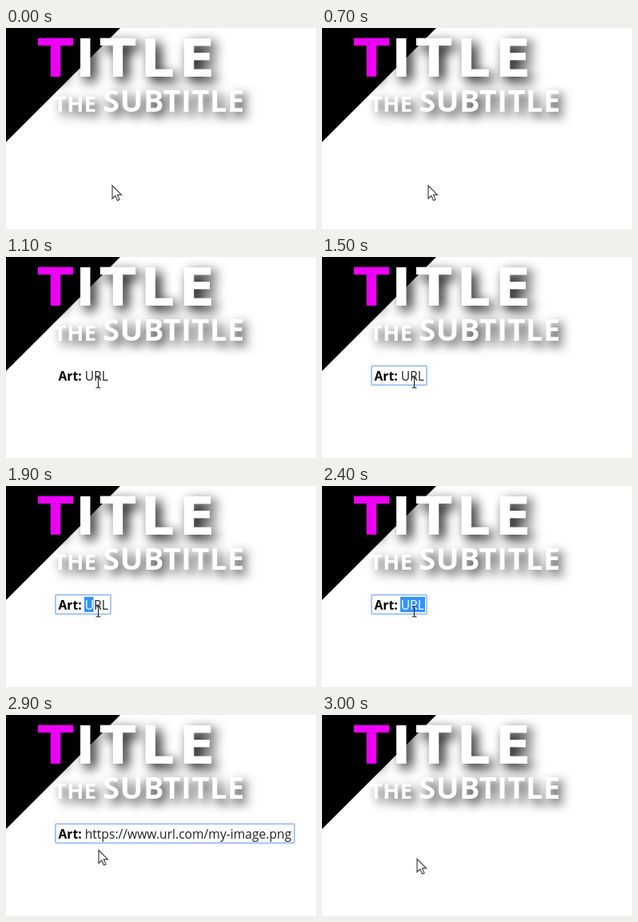
An HTML page for the animation above (3.9 s loop, 388 px wide and 252 px high).

```html
<!DOCTYPE html>
<html lang="en">
<head>
<meta charset="utf-8">
<title>Editable slide</title>
<style>
  html, body { margin: 0; width: 100%; height: 100%; overflow: hidden; background: #fff; }
  svg { display: block; width: 100vw; height: 100vh; }
  text { font-family: "Open Sans", "Noto Sans", sans-serif; white-space: pre; }
  .title { font: 700 66px "DejaVu Sans", sans-serif; letter-spacing: 6px; fill: #fff; text-shadow: 6px 6px 15px #000; }
  .title .first { fill: #ec00f6; }
  .sub { font-weight: 700; letter-spacing: .5px; fill: #fff; text-shadow: 6px 6px 13px rgba(0,0,0,.85); }
  .field text { font-size: 15.65px; fill: #222; }
  .field .label { font-weight: 700; fill: #000; }
  .field .picked { fill: #fff; }
</style>
</head>
<body>
<svg viewBox="0 0 388 252">
  <defs>
    <clipPath id="range"><rect id="rangeBox" x="98" y="139" width="0" height="19"/></clipPath>
  </defs>
  <path d="M0 0H143L0 143Z"/>
  <text class="title" y="60.7"><tspan class="first" x="39.5">T</tspan><tspan x="87">ITLE</tspan></text>
  <text class="sub" y="105"><tspan x="59.8" font-size="27.5">THE</tspan><tspan x="121.3" font-size="38">SUBTITLE</tspan></text>

  <g class="field" id="field">
    <rect id="ring" x="62" y="136.5" height="24" rx="1" fill="none" stroke="#9fc2f7" stroke-width="1.8"/>
    <text class="label" x="65.5" y="155">Art:</text>
    <text id="value" x="98.7" y="155"></text>
    <g clip-path="url(#range)">
      <rect x="98" y="139" width="32" height="19" fill="#3393fb"/>
      <text class="picked" x="98.7" y="155">URL</text>
    </g>
  </g>

  <g id="pointer">
    <path id="arrow" d="M1 .5V16.8L4.8 13.2L7.5 19.2L10 18.1L7.4 12.2H12.4Z" fill="#fff" stroke="#444" stroke-width="1.2"/>
    <path id="beam" d="M-3 -6.5H-1L0 -5.5L1 -6.5H3M0 -5.5V5.5M-3 6.5H-1L0 5.5L1 6.5H3" fill="none" stroke="#222" stroke-width="1.1"/>
  </g>
</svg>
<script>
const LOOP = 3900;
const LINK = "https://www.url.com/my-image.png";
const $ = id => document.getElementById(id);

// Each step changes only the listed properties.
const steps = [
  [0,    { x: 132, y: 197, beam: false, shown: false, focus: false, range: 0, value: "URL" }],
  [800,  { x: 130, y: 191 }],
  [900,  { x: 124, y: 176 }],
  [1000, { x: 116, y: 159, beam: true, shown: true }],
  [1100, { x: 115.5, y: 157.5 }],
  [1500, { focus: true }],
  [1900, { range: 11.5 }],
  [2100, { range: 21.5 }],
  [2200, { range: 31 }],
  [2500, { range: 0, value: LINK }],
  [2800, { x: 115, y: 163, beam: false }],
  [2900, { y: 169 }],
  [3000, { x: 118, y: 180, shown: false, focus: false }]
];

const show = (id, on) => $(id).setAttribute("visibility", on ? "inherit" : "hidden");

function draw(time) {
  const s = Object.assign({}, ...steps.filter(([at]) => at <= time).map(([, change]) => change));
  show("field", s.shown);
  show("ring", s.focus);
  $("ring").setAttribute("width", s.value === LINK ? 299 : 69);
  $("rangeBox").setAttribute("width", s.range);
  if ($("value").textContent !== s.value) $("value").textContent = s.value;
  $("pointer").setAttribute("transform", `translate(${s.x} ${s.y})`);
  show("beam", s.beam);
  show("arrow", !s.beam);
}

const start = performance.now();
function tick() {
  draw((performance.now() - start) % LOOP);
  requestAnimationFrame(tick);
}
draw(0);
requestAnimationFrame(tick);
</script>
</body>
</html>
```
